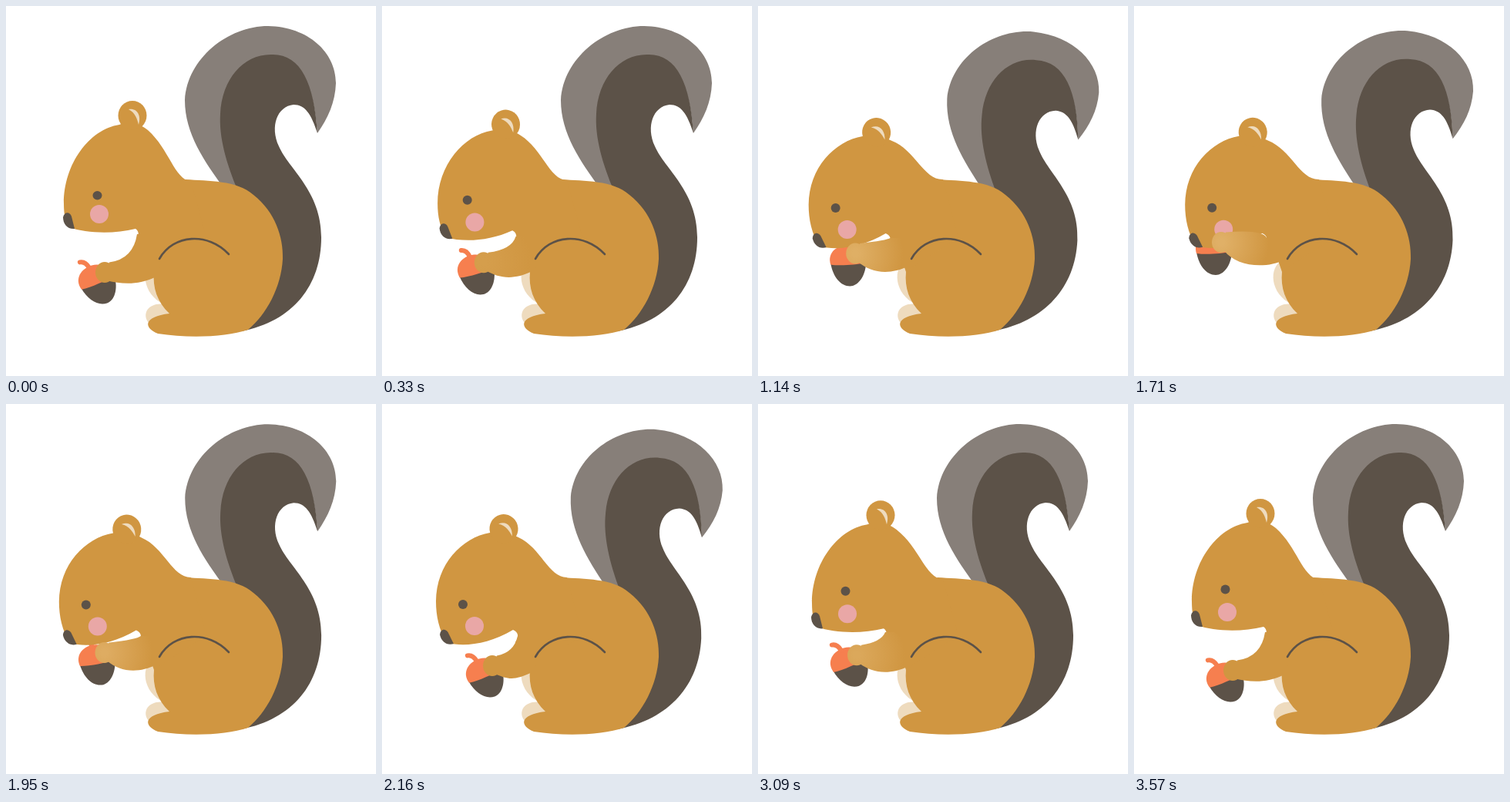
Recreate the animation shown at these times as an HTML page with a canvas. Size 480x480 px, loop 3600 ms.

```html
<!DOCTYPE html>
<html>
<head>
<meta charset="utf-8">
<style>
html, body { margin: 0; width: 100%; height: 100%; overflow: hidden; background: #fff; }
canvas { display: block; width: 480px; height: 480px; }
</style>
</head>
<body>
<canvas id="stage" width="480" height="480"></canvas>
<script>
const ctx = document.getElementById('stage').getContext('2d');
const LOOP = 3600;
const FUR = '#d09641', DARK = '#5c5248', GREY = '#877f79', CREAM = '#eedbbe', ORANGE = '#f67f4f', PINK = '#e9a7a6';

const headUp = 'M240,228 C218,224 212,186 184,161 C172,151 156,150 147,154 C108,160 75,205 75,256 ' +
  'C75,270 77,281 82,287 C104,295 140,296 168,289 C173,292 173,299 168,306 L200,340 L260,300 Z';
const headDown = 'M240,225 C216,225 206,186 177,173 C165,166 150,164 140,167 C104,173 70,208 70,256 ' +
  'C70,275 74,293 84,310 C108,315 138,312 170,293 C177,296 178,302 173,309 L200,340 L260,300 Z';
const tailBack = 'M300,250 L281,234 C258,202 232,166 232,122 C235,68 288,26 340,26 C392,27 428,60 428,100 ' +
  'C427,125 418,145 404,165 C402,140 398,110 385,90 L345,100 Z';
const tailFront = 'M301,240 C286,205 276,170 278,140 C280,95 308,62 345,63 C382,62 400,100 404,165 ' +
  'C396,140 388,128 373,128 C352,130 342,156 354,182 C367,212 409,240 409,300 C409,362 373,409 305,422 L260,350 Z';
const body = 'M233,225 C262,227 300,226 321,245 C349,267 360,300 359,328 C357,365 338,400 314,420 ' +
  'C285,430 235,431 197,425 C178,417 178,403 212,399 C196,384 190,365 192,345 L180,310 L200,240 Z';

const mix = (a, b, k) => a + (b - a) * k;
const clamp = v => Math.max(0, Math.min(1, v));
const ease = v => (v = clamp(v), v * v * (3 - 2 * v));

// Rises from start to full, holds until end, falls to gone; wraps around the loop
function pulse(t, start, full, end, gone) {
  const p = (t - start + LOOP) % LOOP;
  return ease(p / (full - start)) - ease((p - end + start) / (gone - end));
}

function pose(t) {
  const nod = pulse(t, 0, 600, 2300, 3000);
  const eating = pulse(t, 0, 850, 1800, 2160);
  const nibble = .78 + .22 * Math.cos((t - 1710) / 1140 * 2 * Math.PI);
  const lift = eating * nibble + .6 * pulse(t, 2300, 3000, 3100, 3570);
  const lean = pulse(t, 600, 1300, 1500, 2160) + pulse(t, 2500, 3000, 3100, 3570);
  return {
    nod, dx: -5 * lean, dy: 2.3 * lean,
    ax: 119 + nod * (15 - 30 * lift), ay: 358 - 6 * nod - 33 * lift, tilt: -20 * (1 - eating),
    sway: 1.1 * (pulse(t, 600, 1150, 1640, 1920) + pulse(t, 1930, 2190, 2260, 2720)),
    blink: pulse(t, -30, 30, 60, 150) + pulse(t, 580, 680, 700, 800)
  };
}

// Moves every point of a path string
function warp(d, move) {
  let i = 0;
  return d.replace(/([\d.]+),([\d.]+)/g, (_, x, y) => move(+x, +y, i++).join());
}

function fill(d, color) {
  ctx.fillStyle = color;
  ctx.fill(new Path2D(d));
}

function line(d, color, width) {
  ctx.strokeStyle = color;
  ctx.lineWidth = width;
  ctx.lineCap = 'round';
  ctx.stroke(new Path2D(d));
}

function oval(x, y, rx, ry, color) {
  ctx.fillStyle = color;
  ctx.beginPath();
  ctx.ellipse(x, y, rx, ry, 0, 0, Math.PI * 2);
  ctx.fill();
}

function at(x, y, degrees, paint) {
  ctx.save();
  ctx.translate(x, y);
  ctx.rotate(degrees * Math.PI / 180);
  paint();
  ctx.restore();
}

function drawTail(sway) {
  const bend = (x, y) => {
    const k = sway * clamp((420 - y) / 394);
    return [x + 16 * k, y + .08 * k * (x - 255)];
  };
  fill(warp(tailBack, bend), GREY);
  fill(warp(tailFront, bend), DARK);
}

function drawAcorn() {
  fill('M-23,0 C-20,18 -10,30 2,30 C12,30 22,18 23,0 Z', DARK);
  fill('M-23,2 C-28,-14 -14,-24 0,-23 C12,-22 21,-14 21,0 C10,2 -10,4 -23,2 Z', ORANGE);
  line('M-4,-21 Q-6,-31 -13,-32', ORANGE, 6);
}

function drawHead({ nod, dx, dy, blink }) {
  const spot = (x0, y0, x1, y1) => [mix(x0, x1, nod) + dx, mix(y0, y1, nod) + dy];
  const lowered = [];
  warp(headDown, (...point) => (lowered.push(point), point));
  fill(warp(headUp, (x, y, i) => {
    const weight = clamp((235 - x) / 60);
    return [mix(x, lowered[i][0], nod) + dx * weight, mix(y, lowered[i][1], nod) + dy * weight];
  }), FUR);
  at(...spot(164, 142, 158, 162), -15 * nod, () => {
    oval(0, 0, 18.5, 19, FUR);
    fill('M-5,-8 C6,-10 12,0 8,12 C6,4 4,-3 -5,-8 Z', CREAM);
  });
  at(...spot(81, 279, 83, 303), -12 * nod, () =>
    fill('M-7,-5 C-5,-13 2,-12 4,-6 L8,10 C-1,11 -7,4 -7,-5 Z', DARK));
  oval(...spot(121, 270, 120, 288), 12, 12, PINK);
  const [ex, ey] = spot(118.5, 240.5, 105, 260);
  oval(ex + 5 * blink * nod, ey + 10 * blink, 6, 6 - 4.7 * blink ** 4, DARK);
}

function drawArm({ nod, dx, ax, ay }) {
  const hx = ax + 9, hy = ay - 12.5;
  const tx = mix(170, 176, nod) + dx, ty = mix(296, 301, nod);
  const elbow = 360 + .56 * (hy - 346);
  const shine = clamp((338 - hy) / 18);
  const glow = ctx.createRadialGradient(hx, hy, 4, hx, hy, 62);
  glow.addColorStop(0, `rgb(${208 + 16 * shine},${150 + 26 * shine},${65 + 38 * shine})`);
  glow.addColorStop(1, FUR);
  fill(`M${tx},${ty} Q${tx - 5},${hy - 17} ${hx + 6},${hy - 13} L${hx},${hy} L${hx + 4},${hy + 11} ` +
    `C${hx + 20},${elbow} 170,${elbow + 4} 196,${elbow - 9} L205,320 L${tx + 12},${ty} Z`, glow);
  oval(hx, hy, 12, 13.5, glow);
}

function draw(t) {
  const now = pose(t);
  ctx.fillStyle = '#fff';
  ctx.fillRect(0, 0, 480, 480);
  drawTail(now.sway);
  fill('M193,330 C174,338 176,374 205,387 L200,350 Z', CREAM);
  fill('M184,410 C176,398 186,384 206,387 L214,400 Z', CREAM);
  at(now.ax, now.ay, now.tilt, drawAcorn);
  fill(body, FUR);
  drawHead(now);
  drawArm(now);
  line('M199,328 C217,296 262,293 289,322', DARK, 2.6);
}

function frame() {
  draw(performance.now() % LOOP);
  requestAnimationFrame(frame);
}
frame();
</script>
</body>
</html>
```
